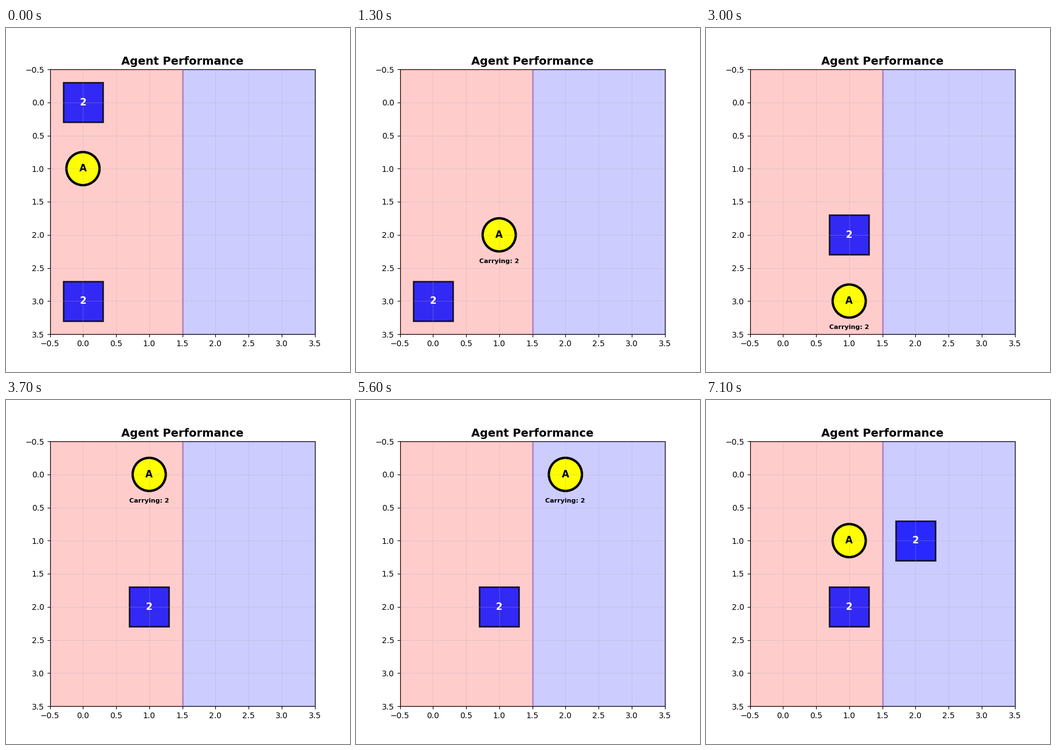
Write a matplotlib script that moves like this. It is 600x600 px and loops after 7200 ms.

```python
import matplotlib.pyplot as plt
from matplotlib.animation import FuncAnimation
from matplotlib.patches import Circle, Rectangle

STEP_MS = 100
MOVES = {"U": (0, -1), "D": (0, 1), "L": (-1, 0), "R": (1, 0)}
# U/D/L/R walk one cell, P picks up or puts down a box
ROUTE = ("UPDDURUL" "RRDLDDRL" "RULDRLUP" "LDPRRLRU" "RULULDRD"
         "UULDRRUD" "ULPLRPDU" "PRLPDLDD" "UDRUUPL")


def simulate():
    """Return the (agent, boxes, carrying) state after every action."""
    agent, boxes, carrying = (0, 1), {(0, 0), (0, 3)}, False
    states = [(agent, boxes, carrying)]
    for action in ROUTE:
        if action == "P":
            boxes = boxes ^ {agent}
            carrying = not carrying
        else:
            dx, dy = MOVES[action]
            agent = (agent[0] + dx, agent[1] + dy)
        states.append((agent, boxes, carrying))
    return states


STATES = simulate()
fig, ax = plt.subplots(figsize=(6, 6), dpi=100)


def label(x, y, text, size=12, color="black"):
    ax.text(x, y, text, ha="center", va="center",
            fontsize=size, fontweight="bold", color=color)


def draw_zone(x, color):
    ax.add_patch(Rectangle((x, -0.5), 2, 4, linewidth=2, edgecolor=color,
                           facecolor=color, alpha=0.2))


def draw_box(x, y):
    ax.add_patch(Rectangle((x - 0.3, y - 0.3), 0.6, 0.6, linewidth=2,
                           edgecolor="black", facecolor="blue", alpha=0.8))
    label(x, y, "2", color="white")


def draw_agent(x, y, carrying):
    ax.add_patch(Circle((x, y), 0.25, linewidth=3,
                        edgecolor="black", facecolor="yellow"))
    label(x, y, "A")
    if carrying:
        label(x, y + 0.4, "Carrying: 2", size=8)


def update(frame):
    agent, boxes, carrying = STATES[frame]
    ax.clear()
    ax.set_xlim(-0.5, 3.5)
    ax.set_ylim(3.5, -0.5)
    ax.set_aspect("equal")
    ax.grid(True, alpha=0.3)
    ax.set_title("Agent Performance", fontsize=14, fontweight="bold")
    draw_zone(-0.5, "red")
    draw_zone(1.5, "blue")
    for box in sorted(boxes):
        draw_box(*box)
    draw_agent(*agent, carrying)
    return []


anim = FuncAnimation(fig, update, frames=len(STATES), interval=STEP_MS,
                     init_func=lambda: update(0), repeat=True, repeat_delay=0)
plt.show()
```
